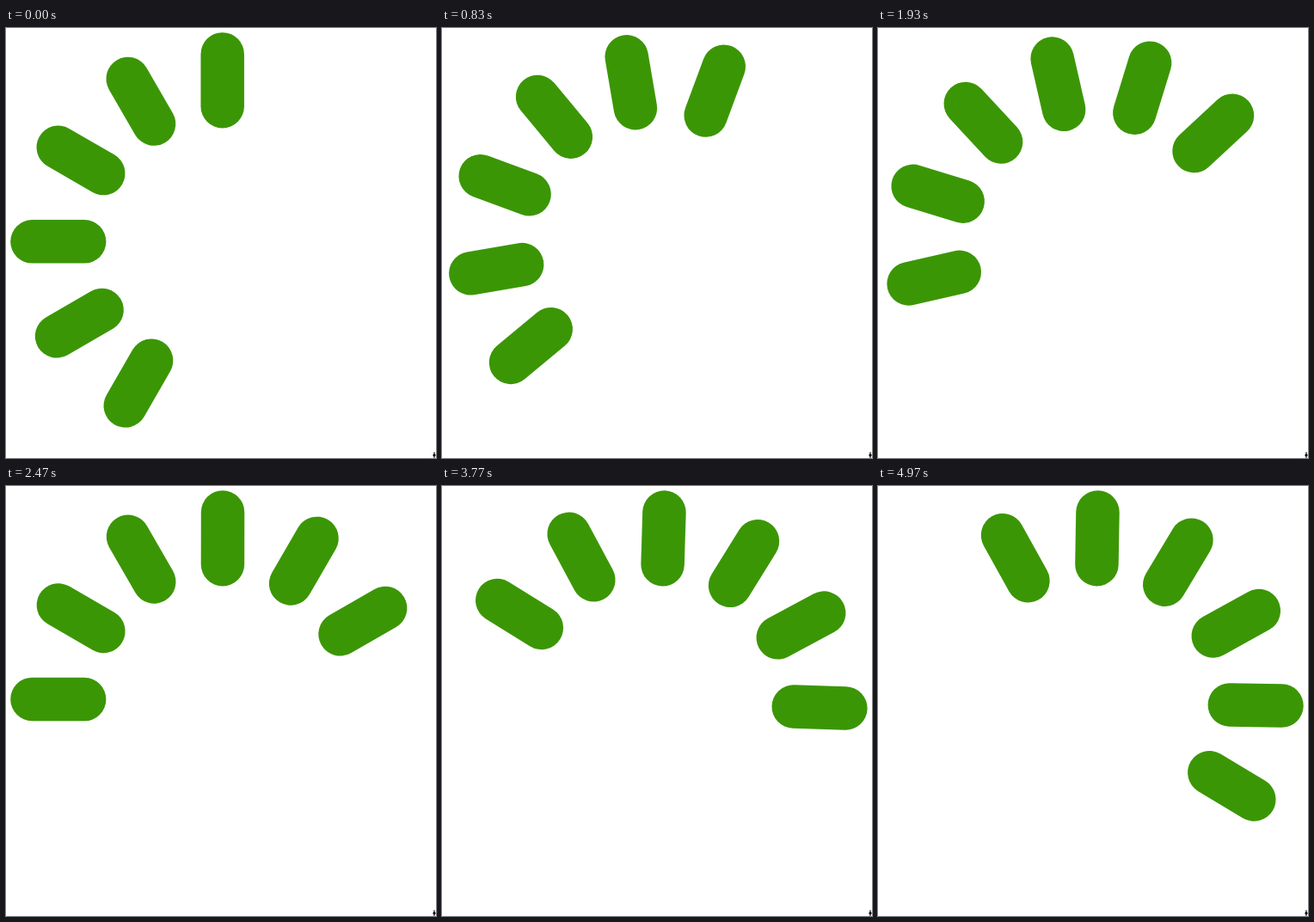
Recreate the animation shown at these times as an HTML page. Size 500x500 px, loop 5.01 s.

```html
<!DOCTYPE html>
<html lang="en">
<head>
<meta charset="utf-8">
<title>Spinner</title>
<style>
  html, body { margin: 0; width: 100%; height: 100%; overflow: hidden; background: #fff; }
  svg { display: block; width: 100vw; height: 100vh; }
</style>
</head>
<body>
<svg viewBox="0 0 500 500">
  <defs>
    <!-- sits slightly clockwise of the radius -->
    <rect id="bar" x="-23.55" y="-244.8" width="50.5" height="111.2" rx="25.25"/>
  </defs>
  <g id="wheel" fill="#3b9605"></g>
  <path d="M497.5 493h1v2l1 1v1.5l-1 1v1.5h-1v-1.5l-1-1v-1.5l1-1z" fill="#000"/>
</svg>
<script>
  const LOOP = 5010, STEPS = 150, BARS = 6, GAP = 30;
  const TURN = 0.812; // degrees per step
  const wheel = document.getElementById('wheel');

  for (let i = 0; i < BARS; i++) {
    const bar = document.createElementNS('http://www.w3.org/2000/svg', 'use');
    bar.setAttribute('href', '#bar');
    bar.setAttribute('transform', `rotate(${-GAP * i})`);
    wheel.append(bar);
  }

  // Steps start at multiples of 100/3 ms, rounded to 10 ms.
  const startOf = k => Math.round(k * 10 / 3) * 10;

  function stepAt(t) {
    let k = Math.min(STEPS - 1, Math.ceil(t * 3 / 100));
    while (startOf(k) > t) k--;
    while (k < STEPS - 1 && startOf(k + 1) <= t) k++;
    return k;
  }

  function draw(t) {
    wheel.setAttribute('transform', `translate(250 250) rotate(${stepAt(t) * TURN})`);
  }

  const begin = performance.now();
  function tick() {
    draw((performance.now() - begin) % LOOP);
    requestAnimationFrame(tick);
  }
  draw(0);
  requestAnimationFrame(tick);
</script>
</body>
</html>
```
